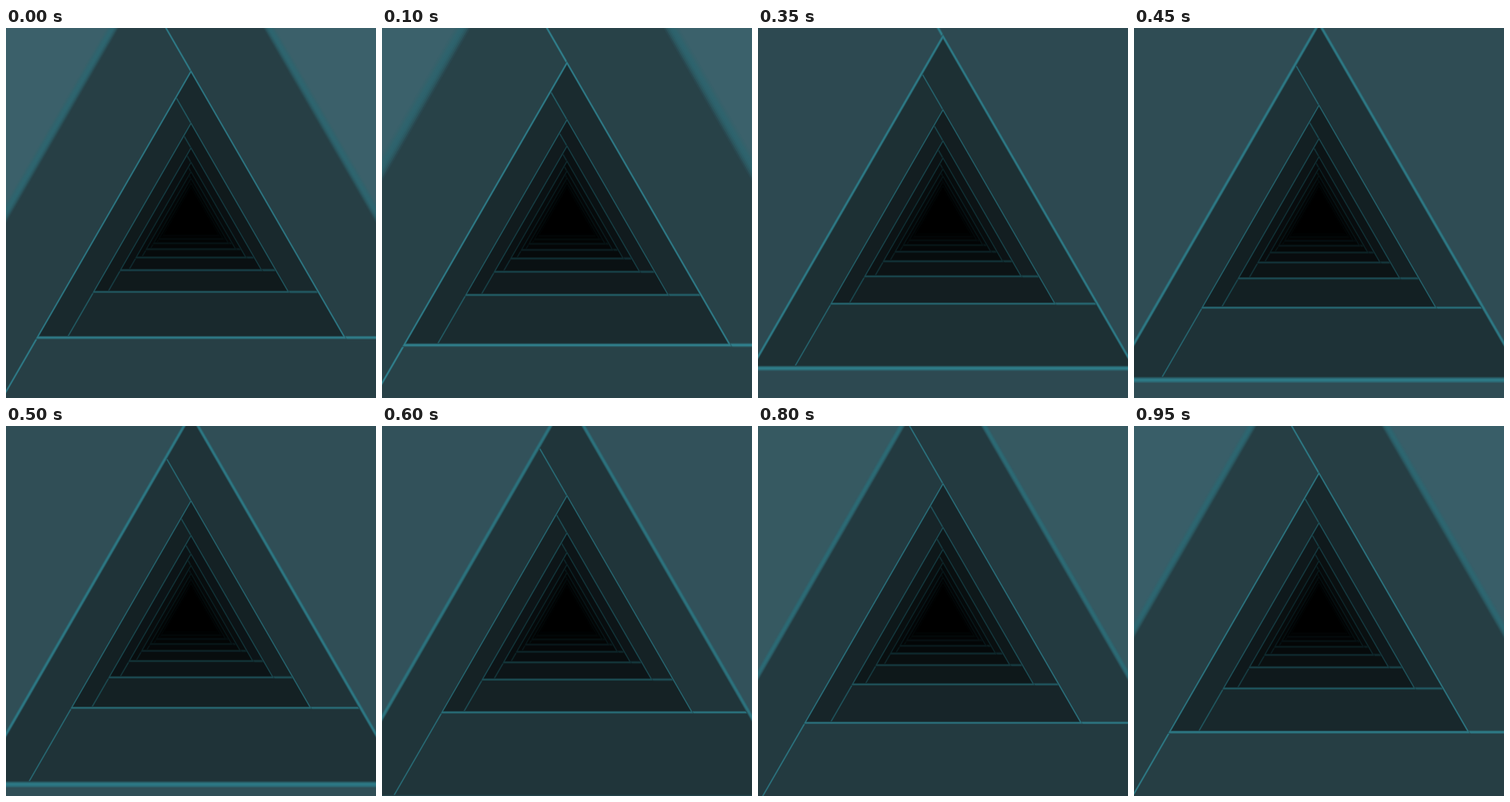
Animation of 500x500 px, one loop 1 s. Source, as an HTML page:

```html
<!DOCTYPE html>
<html lang="en">
<head>
<meta charset="utf-8">
<title>Triangle tunnel</title>
<style>
  html, body { margin: 0; width: 100%; height: 100%; overflow: hidden; background: #000; }
  svg { display: block; width: 100vw; height: 100vh; }
</style>
</head>
<body>
<svg id="stage" viewBox="0 0 500 500"></svg>
<script>
const LOOP = 1000, STEP = 50, LAYERS = 11, STRIPS = 8;
const CX = 250, CY = 250;
const UP = 0.532, DOWN = 0.468;   // share of a triangle's height above and below the centre
const RIM = 0.00008;              // thickness of a wall edge, in depth
const MIN_RIM = 8;                // least difference in height across an edge, in pixels
const ROOT3 = Math.sqrt(3);
const stage = document.getElementById('stage');

function add(name) {
  const el = document.createElementNS('http://www.w3.org/2000/svg', name);
  stage.appendChild(el);
  return el;
}

const wall = add('rect');
wall.setAttribute('width', 500);
wall.setAttribute('height', 500);
const layers = Array.from({ length: LAYERS }, () => ({
  seamGlow: add('path'),
  seamCore: add('path'),
  strips: Array.from({ length: STRIPS }, () => add('path')),
  hole: add('path')
}));

// Depth is the inverse of the triangle's height on screen.
const depth = s => Math.max(0.0002, 0.00119 + 0.00152 * s + 0.00003 * s * s);

const plateColor = u => {
  const g = Math.min(97, 133 * Math.exp(-272 * u));
  return [0.61 * g, g, 1.1 * g];
};

const rimColor = u => {
  const d = u - 0.0026;
  const g = Math.max(0, 138 * Math.exp(d > 0 ? -185 * d : 80 * d) - 8);
  return [0.37 * g, g, 1.1 * g];
};

const mix = (a, b, k) => a.map((v, i) => v + (b[i] - v) * k);
const css = c => `rgb(${c.map(v => Math.round(v)).join(',')})`;
const path = pts => 'M' + pts.map(([x, y]) => (CX + x).toFixed(2) + ' ' + (CY + y).toFixed(2)).join('L') + 'Z';

// Heights of the outer and inner border of a wall edge.
function edge(u) {
  const front = 1 / u, back = 1 / (u + RIM);
  const mid = (front + back) / 2;
  const half = Math.max(front - back, MIN_RIM) / 2;
  return [mid + half, mid - half];
}

function corners(h) {
  const half = h / ROOT3;
  return [[0, -UP * h], [half, DOWN * h], [-half, DOWN * h]];
}

// Where the prolonged edges of a triangle meet the larger triangle around it.
function meets(h, outer) {
  return [
    [UP * (h - outer) / 2 / ROOT3, -UP * (h + outer) / 2],
    [(DOWN * h + UP * outer) / ROOT3, DOWN * h],
    [-(DOWN * outer + UP * h) / ROOT3, DOWN * outer]
  ];
}

function seamPath(h, inner, outer) {
  const a = corners(h), b = corners(inner);
  const ma = meets(h, outer), mb = meets(inner, outer);
  return a.map((p, i) => path([p, ma[i], mb[i], b[i]])).join('');
}

function paint(el, d, color) {
  el.setAttribute('d', d);
  el.setAttribute('fill', css(color));
}

function draw(ms) {
  const t = ms / LOOP;
  wall.setAttribute('fill', css(plateColor(depth(-t))));
  layers.forEach((layer, k) => {
    const u = depth(k - t);
    const plate = plateColor(u), rim = rimColor(u);
    const next = k < LAYERS - 1 ? plateColor(depth(k + 1 - t)) : [0, 0, 0];
    const [h, inner] = edge(u);
    const outer = edge(depth(k - 1 - t))[1];
    const at = f => h + (inner - h) * f;
    const glow = Math.min(1, u / 0.002);   // close edges blur into the walls

    paint(layer.seamGlow, seamPath(h, inner, outer), mix(plate, rim, 0.45 * glow));
    paint(layer.seamCore, seamPath(at(0.25), at(0.75), outer), mix(plate, rim, glow));
    layer.strips.forEach((strip, i) => {
      const f = (i + 0.5) / STRIPS;
      const color = mix(mix(plate, next, f), rim, glow * Math.sin(Math.PI * f));
      paint(strip, path(corners(at(i / STRIPS))), color);
    });
    paint(layer.hole, path(corners(inner)), next);
  });
}

const start = performance.now();
function tick() {
  const ms = (performance.now() - start) % LOOP;
  draw(Math.floor(ms / STEP) * STEP);
  requestAnimationFrame(tick);
}
tick();
</script>
</body>
</html>
```
